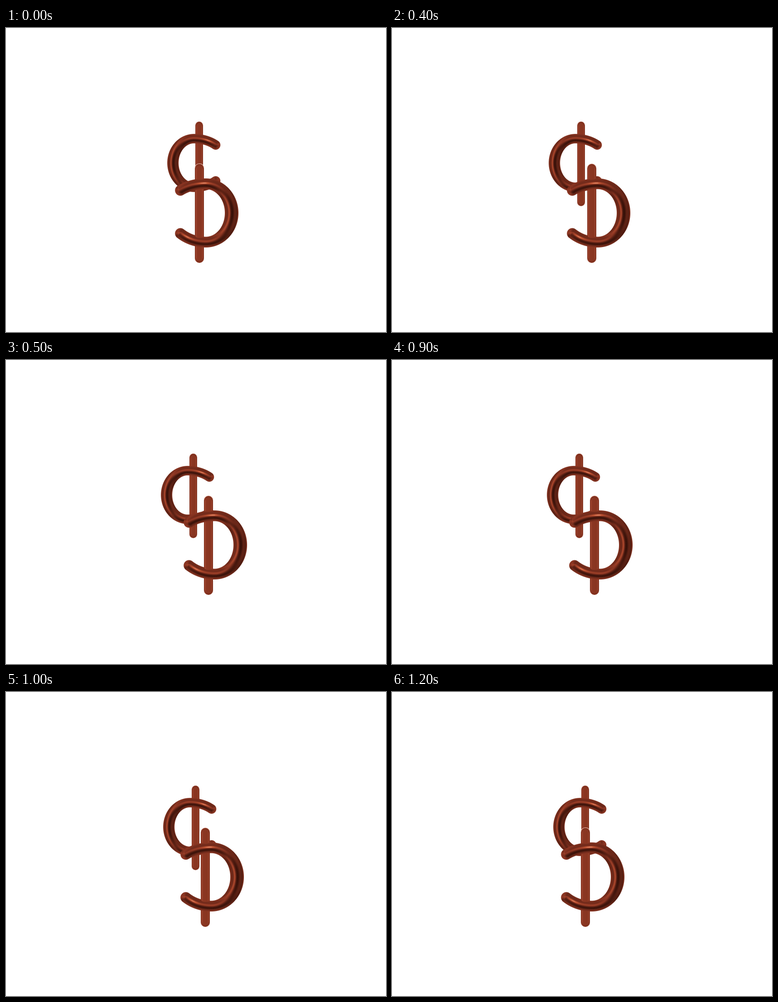
An HTML page with a canvas that plays this animation: 837 by 669 pixels, repeating every 1.3 s.

```html
<!DOCTYPE html>
<html lang="en">
<head>
<meta charset="utf-8">
<title>Dollar coils</title>
<style>
  html, body { margin: 0; width: 100%; height: 100%; overflow: hidden; background: #fff; }
  canvas { display: block; }
</style>
</head>
<body>
<canvas id="stage" width="837" height="669"></canvas>
<script>
const ctx = document.getElementById('stage').getContext('2d');
const LOOP = 1300, STEP = 100, SIZE = 190, HALF = SIZE / 2, END = 2.31;

// Copper tones from shadow to highlight
const TONES = [[46, 13, 6], [138, 53, 34], [200, 88, 52], [255, 215, 190]];

const clamp = (x, a = 0, b = 1) => Math.min(b, Math.max(a, x));
const lerp = (a, b, k) => a + (b - a) * k;
const bump = (x, mid, width) => Math.exp(-(((x - mid) / width) ** 2));

function copper(tone) {
  const t = clamp(tone, 0, 2.99), i = Math.floor(t);
  return TONES[i].map((c, j) => lerp(c, TONES[i + 1][j], t - i));
}

// Light reflected across upright and level parts of the tube
const upright = x => .55 + .42 * x ** 4 + bump(x, -.35, .15) - .5 * bump(x, .1, .25) - .3 * bump(x, .75, .13);
const level = y => .72 + .28 * y ** 4 + .6 * bump(y, -.15, .18) - .62 * bump(y, .38, .25);

// Points along the tube's centre line, open on the left
function centreLine(o) {
  const pts = [];
  for (let i = 0; i <= 240; i++) {
    const t = END * (i / 120 - 1), c = Math.cos(t), s = Math.sin(t);
    const rx = c > 0 ? o.rx : o.tail;
    const nx = c / rx, ny = -s / o.ry, n = Math.hypot(nx, ny);
    pts.push({
      t, ny: ny / n, nx: nx / n,
      x: o.cx + rx * c,
      y: -o.ry * s - o.lift * Math.min(0, c) ** 2,
      r: o.r + o.swell * Math.max(0, c) ** 2
    });
  }
  return pts;
}

function shade(p, gx, gy, o) {
  const along = Math.abs(gy * p.nx - gx * p.ny);
  const tip = clamp(along * 1.2);
  let tone = lerp(upright(o.flip * gx), level(gy), p.ny ** 2);
  for (const at of o.glints) tone += 1.3 * bump(p.t, at, .17) * bump(gy, -.12, .15);
  return copper(lerp(tone, 1, tip));
}

function makeRing(o) {
  const cv = document.createElement('canvas');
  cv.width = cv.height = SIZE;
  const g = cv.getContext('2d'), img = g.createImageData(SIZE, SIZE);
  const pts = centreLine(o);
  for (let y = 0; y < SIZE; y++) for (let x = 0; x < SIZE; x++) {
    const px = o.flip * (x + .5 - HALF), py = y + .5 - HALF;
    let best = null, near = 1e9;
    for (const p of pts) {
      const d = (px - p.x) ** 2 + (py - p.y) ** 2;
      if (d < near) { near = d; best = p; }
    }
    const alpha = clamp(best.r - Math.sqrt(near) + .5);
    if (!alpha) continue;
    const col = shade(best, (px - best.x) / best.r, (py - best.y) / best.r, o);
    img.data.set([...col, alpha * 255], (y * SIZE + x) * 4);
  }
  g.putImageData(img, 0, 0);
  return cv;
}

// Glints are angles along the ring
const front = makeRing({ flip: 1, cx: 14, rx: 57, tail: 83, ry: 64.2, lift: 5, r: 11.8, swell: 3.2, glints: [1.62, -2.1] });
const back = makeRing({ flip: -1, cx: 12, rx: 46.3, tail: 71, ry: 53.5, lift: 0, r: 10.4, swell: 2.1, glints: [2.02] });

function bar(x, y, w, h, radii = w / 2) {
  const fill = ctx.createLinearGradient(x - w / 2, 0, x + w / 2, 0);
  ['#7c2e1d', '#9c432d', '#8c3723', '#8a3622', '#8a3622', '#88351f', '#8a3622', '#963f29', '#762b1a']
    .forEach((c, i, all) => fill.addColorStop(i / (all.length - 1), c));
  ctx.beginPath();
  ctx.roundRect(x - w / 2, y, w, h, radii);
  ctx.fillStyle = fill;
  ctx.fill();
}

function arc(x, y, r, from, to, color) {
  ctx.beginPath();
  ctx.arc(x, y, r, from, to);
  ctx.strokeStyle = color;
  ctx.lineWidth = 1.2;
  ctx.stroke();
}

// A bar with bevelled round ends
function post(x, y, w, h) {
  const r = w / 2, groove = 'rgba(90,30,17,.4)';
  bar(x, y, w, h);
  arc(x, y + r, r - 2.5, Math.PI, 0, groove);
  arc(x, y + h - r, r - 2.5, 0, Math.PI, groove);
}

function ring(img, x, y) {
  ctx.drawImage(img, Math.round(x) - HALF, y - HALF);
}

function draw(spread) {
  ctx.fillStyle = '#fff';
  ctx.fillRect(0, 0, 837, 669);

  post(425.5 - Math.round(13 * spread), 206, 17, 186);
  ring(back, 426 - 14 * spread, 297);

  const x = 426 + Math.round(20 * spread);
  arc(x, 309, 10.4, Math.PI * 1.08, Math.PI * 1.92, 'rgba(255,226,216,.8)');
  post(x, 299, 20, 218);
  ring(front, 426 + 18.5 * spread, 407);
  // the bar dips slightly into the tube
  bar(x, 320, 20, 14, [0, 0, 8, 8]);
  bar(x, 445, 20, 17, [0, 0, 8, 8]);
}

// Four steps apart from 300 ms, four steps back from 900 ms
function spreadAt(t) {
  const n = Math.floor(t / STEP);
  const open = clamp((n - 2) / 4) ** .85;
  const close = clamp((n - 8) / 4);
  return 1.3 * (n < 9 ? open : 1 - close);
}

let shown = null;
function tick() {
  const spread = spreadAt(performance.now() % LOOP);
  if (spread !== shown) draw(shown = spread);
  requestAnimationFrame(tick);
}
tick();
</script>
</body>
</html>
```
